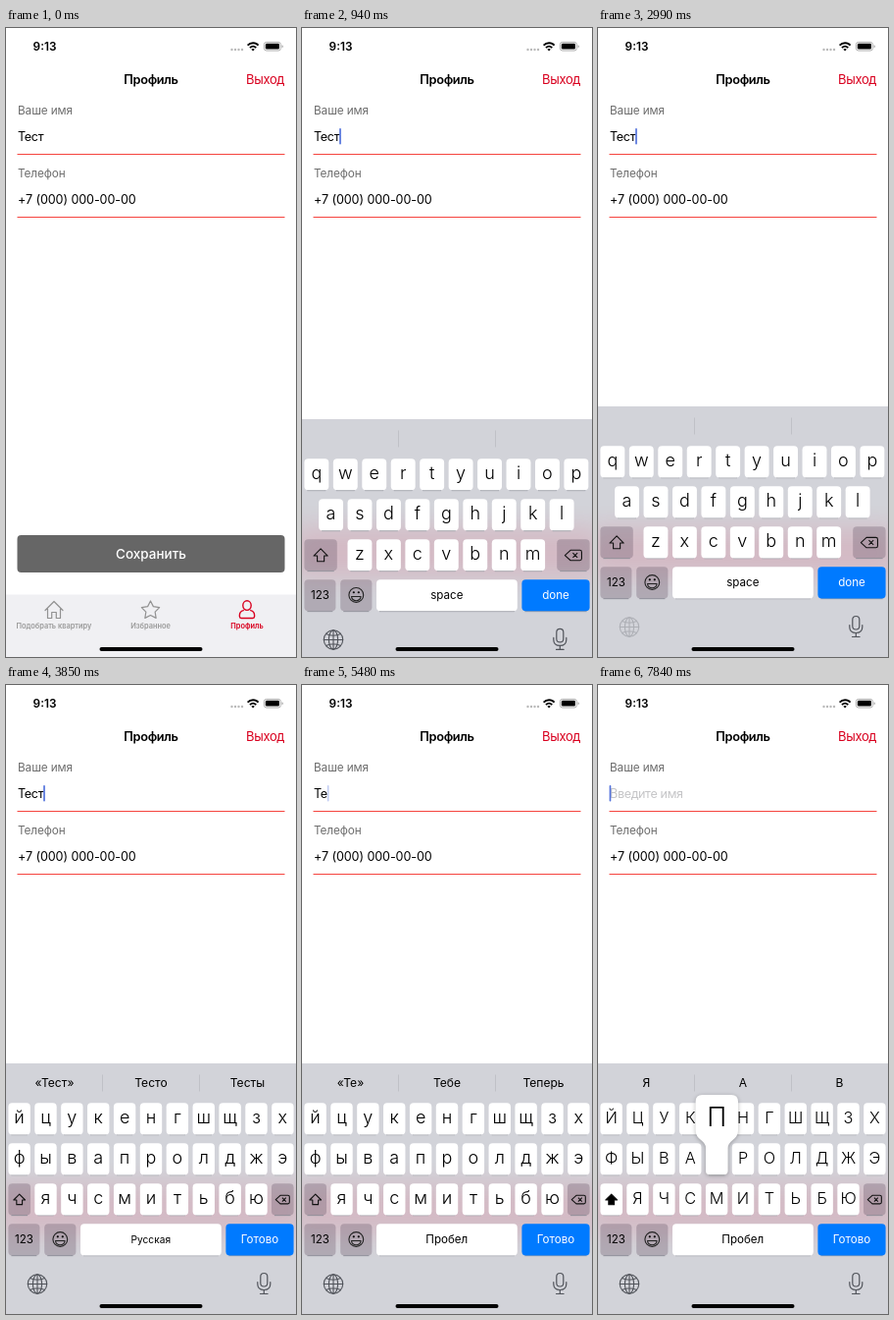
Animation, 296 px wide and 640 px high, one loop 8000 ms. Source, as an HTML page:

```html
<!DOCTYPE html>
<html lang="ru">
<head>
<meta charset="utf-8">
<title>Профиль</title>
<style>
  html, body { margin: 0; width: 100%; height: 100%; overflow: hidden; background: #fff; }
  svg { display: block; width: 100%; height: 100%; }
  text { font-family: Inter, Roboto, "Noto Sans", sans-serif; }
  .mid { text-anchor: middle; }
  .line { fill: none; stroke-linecap: round; stroke-linejoin: round; }
  .label { font-size: 11.8px; letter-spacing: -.1px; fill: #6e6e6e; }
  .value { font-size: 12.6px; letter-spacing: -.35px; }
  .tab { font-size: 7.4px; font-weight: 600; fill: #9a9a9a; }
  .key { fill: #fff; }
  .special { fill: rgba(104, 84, 104, .32); }
  .edge { stroke: #9698a0; stroke-width: 1; }
  .letter { text-anchor: middle; font-weight: 350; }
  .band { fill: #e3002b; opacity: .115; filter: blur(13px); }
</style>
</head>
<body>
<svg viewBox="0 0 296 640" preserveAspectRatio="none">
  <defs><clipPath id="panel"><rect y="385" width="296" height="255"/></clipPath></defs>
  <rect width="296" height="640" fill="#fff"/>

  <!-- status bar -->
  <text x="39.5" y="23" class="mid" font-size="11.8" font-weight="600">9:13</text>
  <g fill="#b9b9b9">
    <circle cx="230.5" cy="22" r="1.2"/><circle cx="234" cy="22" r="1.2"/>
    <circle cx="237.5" cy="22" r="1.2"/><circle cx="241" cy="22" r="1.2"/>
  </g>
  <g fill="none" stroke="#000" stroke-width="2">
    <path d="M246.600 17.600a7.800 7.800 0 0 1 11 0M249 20.100a4.400 4.400 0 0 1 6.200 0"/>
  </g>
  <path d="M252.100 23.600l-1.700-1.800q1.700-1.400 3.400 0z"/>
  <rect x="263.4" y="14.4" width="17" height="8.6" rx="2.4" fill="none" stroke="#a5a5a5" stroke-width=".9"/>
  <rect x="264.8" y="15.8" width="14.2" height="5.8" rx="1.3"/>
  <path d="M281.600 17.200q1.300.4 1.300 1.500t-1.300 1.500z" fill="#a5a5a5"/>

  <!-- form -->
  <text x="148" y="56.8" class="mid" font-size="12.8" font-weight="600" letter-spacing="-.35">Профиль</text>
  <text x="284" y="56.8" text-anchor="end" font-size="13" letter-spacing="-.35" fill="#d9001f">Выход</text>
  <text x="12" y="88.3" class="label">Ваше имя</text>
  <text x="12" y="115.2" class="value" id="hint" fill="#c5c5c7">Введите имя</text>
  <text x="12" y="115.2" class="value" id="name"></text>
  <rect id="caret" y="102" width="1.7" height="16.5" rx=".8" fill="#5473dc"/>
  <text x="12" y="152.3" class="label">Телефон</text>
  <text x="12" y="179.2" font-size="12.6" letter-spacing="-.1">+7 (000) 000-00-00</text>
  <path d="M11.500 128.500h273M11.500 192.500h273" stroke="#f5443f"/>
  <rect id="save" x="11.5" y="516" width="273" height="38" rx="4"/>
  <text x="148" y="540" class="mid" font-size="13.5" font-weight="500" fill="#fff">Сохранить</text>

  <!-- tab bar -->
  <rect y="576.5" width="296" height="63.5" fill="#f0f0f3"/>
  <g class="line" stroke="#929292" stroke-width="1.2">
    <path d="M40 592.500l9-9 9 9M42.500 591v9.500h4.200v-6h4.600v6h4.200V591"/>
    <path id="star"/>
  </g>
  <g class="line" stroke="#d9001f" stroke-width="1.4">
    <ellipse cx="246" cy="587.6" rx="4.2" ry="4.8"/>
    <path d="M242.300 592.600q-3.900 1-3.900 5v1.200q0 1.700 1.700 1.700h11.800q1.700 0 1.700-1.700v-1.200q0-4-3.900-5"/>
  </g>
  <text x="49" y="611" class="tab mid">Подобрать квартиру</text>
  <text x="147.5" y="611" class="tab mid">Избранное</text>
  <text x="246" y="611" class="tab mid" style="fill:#d9001f">Профиль</text>

  <!-- keyboard -->
  <g id="board" clip-path="url(#panel)">
    <rect y="385" width="296" height="255" fill="#d2d3d9"/>
    <rect id="band" class="band" x="-10" y="508" width="316" height="52"/>
    <path d="M98.500 396.500v17M197.500 396.500v17" stroke="#c0c1c7"/>
    <g id="words" class="mid" font-size="12.1"></g>
    <g id="keys"></g>
    <g class="line" stroke="#222" stroke-width="1.1">
      <circle cx="55.3" cy="564" r="7.4"/>
      <path d="M50.500 565.500h9.600q-.6 4.300-4.800 4.300t-4.800-4.300z"/>
    </g>
    <circle cx="52.8" cy="561.3" r="1.1"/><circle cx="57.8" cy="561.3" r="1.1"/>
    <g id="globe" class="line" stroke="#50535a" stroke-width="1.1">
      <circle cx="32" cy="609.5" r="9.7"/>
      <ellipse cx="32" cy="609.5" rx="4.6" ry="9.7"/>
      <path d="M32 599.800v19.400M22.300 609.500h19.400M24.500 603.500q7.500 3.500 15 0M24.500 615.500q7.500-3.500 15 0"/>
    </g>
    <g class="line" stroke="#50535a" stroke-width="1.2">
      <rect x="259.8" y="598.5" width="7" height="13.5" rx="3.5"/>
      <path d="M256.800 607.500v2q0 6 6.500 6t6.500-6v-2M263.300 615.500v4M259.500 619.500h7.600"/>
    </g>
    <g id="popup">
      <path d="M107 417h29q7 0 7 7v29q0 6-5.500 10-5 4-5 8v23q0 4-4 4h-14.400q-4 0-4-4v-23q0-4-5-8-5.500-4-5.500-10v-29q0-7 7-7z"
            fill="#fff" style="filter:drop-shadow(0 1px 2px rgba(0,0,0,.28))"/>
      <text x="121.3" y="448.5" class="mid" font-size="27" font-weight="300">П</text>
    </g>
  </g>
  <rect x="95.5" y="630" width="105" height="4" rx="2"/>
</svg>
<script>
const LOOP = 8000, TICK = 110, PANEL = 255;
const ROW = 41, TOP = 425.2, KEY_H = 32.2;
const $ = id => document.getElementById(id);

function add(parent, tag, attrs, text) {
  const el = document.createElementNS('http://www.w3.org/2000/svg', tag);
  for (const k in attrs) el.setAttribute(k, attrs[k]);
  if (text) el.textContent = text;
  return parent.appendChild(el);
}
const group = parent => add(parent, 'g', {});

function key(g, row, x, w, cls = 'key') {
  const y = TOP + ROW * row;
  add(g, 'path', { d: `M${x + 3} ${y + KEY_H + .3}h${w - 6}`, class: 'edge' });
  return add(g, 'rect', { x, y, width: w, height: KEY_H, rx: 4, class: cls });
}
const caption = (g, x, text, fill = '#000', size = 11.6) =>
  add(g, 'text', { x, y: 568, class: 'mid', fill, 'font-size': size }, text);

// One alphabet: three letter rows, shift and backspace.
function layout(rows, { pitch, width, starts, side, size, scale, upper, done }) {
  const g = group($('keys'));
  rows.forEach((row, r) => [...row].forEach((ch, i) => {
    const x = starts[r] + pitch * i;
    key(g, r, x, width);
    add(g, 'text', { x: x + width / 2, y: TOP + ROW * r + 21.2, class: 'letter', 'font-size': size }, ch);
  }));
  const right = 293.6 - side;
  key(g, 2, 2.4, side, upper ? 'key' : 'special');
  g.erase = key(g, 2, right, side, 'special');
  const icon = (x, d, fill = 'none') => add(g, 'path', {
    d, fill, stroke: '#111', 'stroke-width': 1.1 / scale, 'stroke-linejoin': 'round',
    transform: `translate(${x} 523.600) scale(${scale})`
  });
  icon(2.4 + side / 2, 'M0-7L7.500 .5H3.700V6.500H-3.700V.5H-7.500Z', upper ? '#000' : 'none');
  icon(right + side / 2, 'M-3-5.500H7q2 0 2 2v7q0 2-2 2H-3L-9 0ZM-.5-2.500l5 5m0-5l-5 5');
  caption(g, 259, done, '#fff');
  return g;
}

const base = group($('keys'));
key(base, 3, 2.4, 32, 'special');
key(base, 3, 39.2, 32.2, 'special');
key(base, 3, 76, 143.8);
key(base, 3, 224.4, 69.2).style.fill = '#007aff';
caption(base, 18.4, '123');

const latin = { pitch: 29.45, width: 24.9, starts: [2.4, 17.1, 46.5], side: 33.4, size: 18, scale: .95, done: 'done' };
const cyrillic = { pitch: 26.88, width: 22.4, starts: [2.4, 2.4, 29.3], side: 22.6, size: 18, scale: .78, done: 'Готово' };
const ruRows = ['йцукенгшщзх', 'фывапролджэ', 'ячсмитьбю'];
const layouts = [
  layout(['qwertyuiop', 'asdfghjkl', 'zxcvbnm'], latin),
  layout(ruRows, cyrillic),
  layout(ruRows.map(r => r.toUpperCase()), { ...cyrillic, size: 16.3, upper: true })
];
const spaces = [['space', 11.6], ['Русская', 10.2], ['Пробел', 11.6]]
  .map(([text, size]) => caption($('keys'), 147.8, text, '#000', size));
const words = [49.5, 148, 246.5].map(x => add($('words'), 'text', { x, y: 409.2, class: 'mid' }));

$('star').setAttribute('d', 'M' + Array.from({ length: 10 }, (_, i) => {
  const r = i % 2 ? 4.9 : 9.6, a = Math.PI * i / 5;
  return `${(147.5 + r * Math.sin(a)).toFixed(2)} ${(592.6 - r * Math.cos(a)).toFixed(2)}`;
}).join('L') + 'Z');

// Stepped tracks: [start ms, value]
const names = [[0, 'Тест'], [4080, 'Тес'], [4690, 'Те'], [6310, 'Т'], [6540, '']];
const hints = [[0, ''], [3260, '«Тест» Тесто Тесты'], [4200, '«Тес» Тест Тесто'],
  [4800, '«Те» Тебе Теперь'], [6310, '«Т» Ты Так'], [6540, 'Я А В']];
const alphabet = [[0, 0], [3140, 1], [6540, 2]];
const erasing = [[0, 0], [4080, 1], [4200, 0], [4690, 1], [4800, 0], [6310, 1], [6430, 0], [6540, 1], [6650, 0]];
const caret = [[0, 0], [500, 1], [1520, .4], [1640, 0], [2180, .5], [2300, 1], [2540, .4], [2660, 0],
  [2990, 1], [5480, .35], [6030, .7], [6140, 1], [7250, .35], [7490, .15], [7610, 0], [7840, 1]];
const at = (track, t) => track.reduce((v, [start, next]) => t >= start ? next : v, track[0][1]);
const clamp = v => Math.min(1, Math.max(0, v));

// Critically damped rise, advanced in ticks.
function rise(t) {
  const dt = Math.floor((t - 500) / TICK) * TICK - TICK;
  if (dt <= 0) return 0;
  const x = dt * .01432;
  return dt >= 500 ? 1 : 1 - (1 + x) * Math.exp(-x);
}

function render(t) {
  const drop = PANEL * (1 - rise(t));
  $('board').setAttribute('transform', `translate(0 ${drop})`);
  $('band').setAttribute('transform', `translate(0 ${-drop})`);
  $('save').setAttribute('fill', t < 500 ? '#666' : '#df001f');

  const name = at(names, t);
  $('name').textContent = name;
  $('hint').style.display = name ? 'none' : '';
  $('caret').setAttribute('x', name ? 12 + $('name').getComputedTextLength() : 11.6);
  $('caret').style.opacity = at(caret, t);

  const current = at(alphabet, t);
  layouts.forEach((g, i) => g.style.display = i === current ? '' : 'none');
  layouts[current].erase.style.fill = at(erasing, t) ? '#fff' : '';
  const list = at(hints, t).split(' ');
  words.forEach((el, i) => el.textContent = list[i] || '');

  const fade = clamp((t - 4750) / 400);
  [current ? 0 : 1, current ? 1 - fade : 0, fade].forEach((v, i) => spaces[i].style.opacity = v);
  $('globe').style.opacity = t >= 2990 && t < 3140 ? .28 : 1;
  $('popup').style.display = t >= 7840 ? '' : 'none';
}

const start = performance.now();
function frame() {
  render((performance.now() - start) % LOOP);
  requestAnimationFrame(frame);
}
frame();
</script>
</body>
</html>
```
